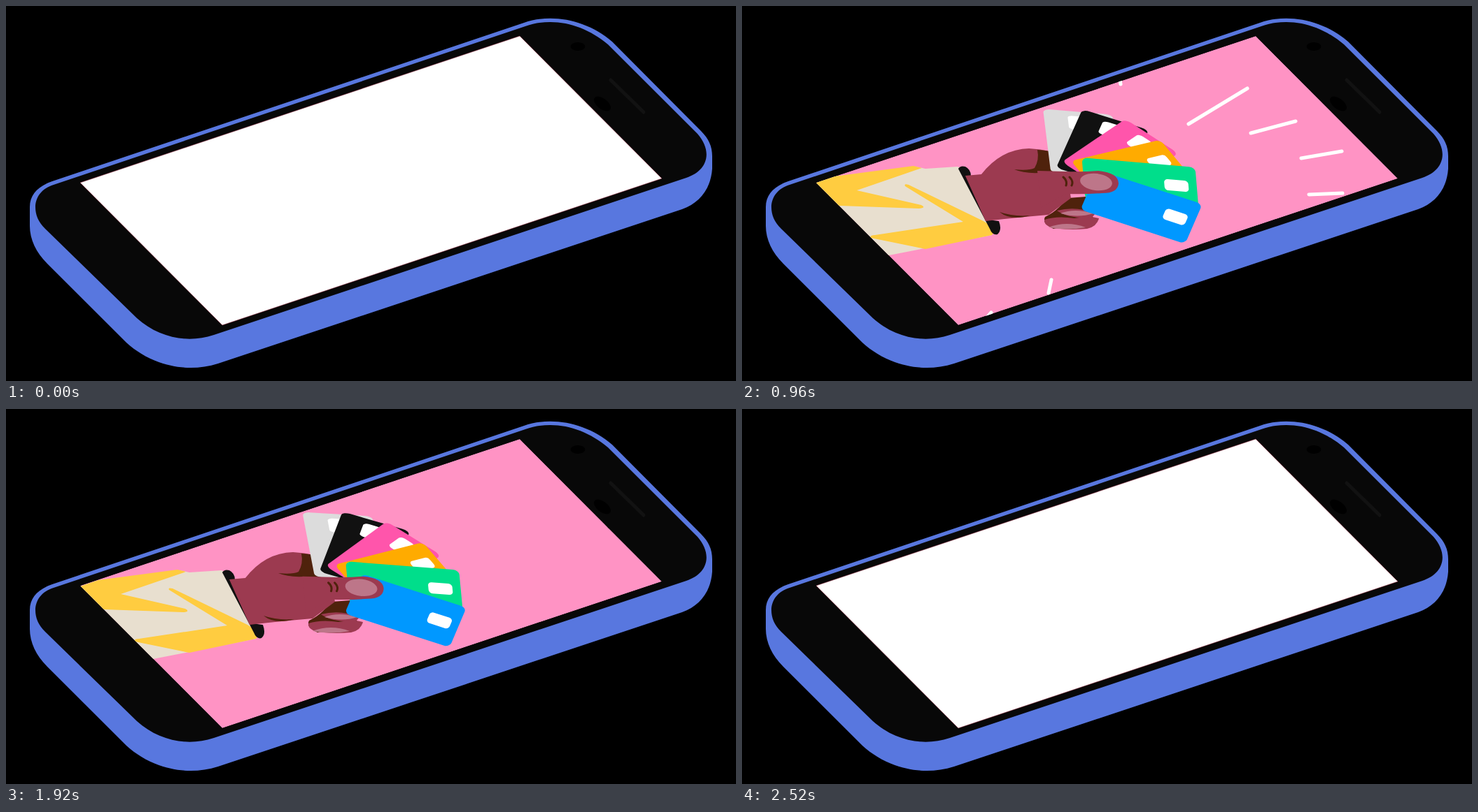
These frames come from a looping animation (1043x537 px, 3.08 s). An HTML page:

```html
<!DOCTYPE html>
<html lang="en">
<head>
<meta charset="utf-8">
<title>Card fan on a phone</title>
<style>
  html, body { margin: 0; width: 100%; height: 100%; overflow: hidden; background: #000; }
  svg { display: block; width: 100vw; height: 100vh; }
  .skin { fill: #9c3a50; }
  .shade { fill: #4f220c; }
  .nail { fill: #bd7689; }
  .yellow { fill: #ffcc40; }
</style>
</head>
<body>
<svg viewBox="0 0 1043 537">
  <defs>
    <clipPath id="glass"><path d="M106 253L734 43L937 247L309 457Z"/></clipPath>
  </defs>

  <path fill="#5877df" d="M34 288C34 270 46 258 66 251L740 24C780 10 830 20 866 51L993 179C1004 190 1009 201 1009 215V233C1007 262 991 282 966 291L303 512C256 527 206 513 172 482L59 369C43 353 34 334 34 315Z"/>
  <path fill="#080808" d="M42 288C42 273 52 261 68 256L742 29C782 15 826 26 860 55L988 183C1010 208 1003 236 972 246L297 471C258 484 217 474 187 447L56 319C46 309 42 299 42 288Z"/>
  <ellipse cx="817" cy="58" rx="10.5" ry="6"/>
  <ellipse cx="852" cy="140" rx="14" ry="7.5" transform="rotate(38 852 140)"/>
  <path d="M864 106L911 152" stroke="#121212" stroke-width="5" stroke-linecap="round"/>

  <path id="blank" d="M106 253L734 43L937 247L309 457Z" fill="#fff" stroke="#a03048" stroke-width=".5"/>
  <g id="scene" clip-path="url(#glass)">
    <path fill="#ff93c4" d="M106 253L734 43L937 247L309 457Z"/>
    <g id="corner">
      <path class="yellow" d="M270 418Q302 430 331 450L309 460Z"/>
      <path fill="#fff" d="M295 443Q308 445 322 453L309 460Z"/>
    </g>
    <g id="rays" stroke="#fff" stroke-width="5" stroke-linecap="round"></g>

    <g id="arm">
      <path fill="#e8dfcf" d="M-300 300L106 253L132 244L248 230L262 233L308 230L320 236L364 318L357 328L210 357L-300 420Z"/>
      <path class="yellow" d="M-300 300L106 253L132 244L245 229L257 232L164 264L256 285Q264 289 253 290L140 286L-300 340Z"/>
      <path class="yellow" d="M233 258Q231 254 238 256L345 308L364 320L357 328L262 348L184 332Q182 328 190 328L316 309Z"/>
      <path fill="#111" d="M309 233Q312 228 319 230Q327 234 327 243L351 306L367 308Q372 321 365 327Q358 329 354 319Z"/>
      <path class="shade" d="M466 275L492 273L489 292L508 308L445 319Q428 311 433 302Q445 296 452 289Z"/>
      <path class="skin" d="M319 243L342 241Q370 205 410 204Q445 206 456 216L465 245L470 275L438 299Q400 302 348 308Z"/>
      <path class="shade" d="M422 206Q448 207 456 217L446 228L464 241L425 239Q403 240 389 234Q410 236 418 232Q425 220 422 206Z"/>
      <path class="shade" d="M368 295Q388 302 412 300Q384 308 368 295Z"/>
      <path class="skin" d="M450 293Q478 286 505 297L500 303Q467 305 450 293Z"/>
      <path class="nail" d="M455 297Q475 289 502 297Q480 304 455 297Z"/>
      <path class="skin" d="M432 306Q450 300 475 304Q497 300 510 304Q507 316 493 319Q460 322 439 316Q431 312 432 306Z"/>
      <path class="nail" d="M438 317Q464 307 491 317Q464 322 438 317Z"/>
      <g id="cards"></g>
      <g id="thumb">
        <path class="skin" d="M425 241L465 242Q488 243 512 241Q541 244 541 259Q540 273 518 273Q492 275 466 274L430 294Z"/>
        <ellipse class="nail" cx="509" cy="257" rx="23" ry="12" transform="rotate(7 509 257)"/>
        <path d="M462 250Q468 255 466 262M471 250Q477 256 474 262" fill="none" stroke="#4f220c" stroke-width="3" stroke-linecap="round"/>
      </g>
    </g>
  </g>
</svg>
<script>
const LOOP = 3080, STEP = 40, SHOW = 360, HIDE = 2520;
const $ = id => document.getElementById(id);

function add(parent, name, attrs) {
  const node = document.createElementNS('http://www.w3.org/2000/svg', name);
  for (const key in attrs) node.setAttribute(key, attrs[key]);
  return parent.appendChild(node);
}

const mix = (a, b, k) => a + (b - a) * k;
const mixAll = (a, b, k) => a.map((v, i) => mix(v, b[i], k));

// Linear interpolation in a table of [time, value].
function track(keys, t) {
  if (t <= keys[0][0]) return keys[0][1];
  for (let i = 1; i < keys.length; i++) {
    const [t0, v0] = keys[i - 1], [t1, v1] = keys[i];
    if (t <= t1) return mix(v0, v1, (t - t0) / (t1 - t0));
  }
  return keys[keys.length - 1][1];
}

// Each pose: corner x, y, long side x, y, short side x, y.
const cards = [
  { fill: '#dcdcdc', half: [443, 226, 60, -70, 95, 33], open: [441, 240, -21, -94, 100, 5] },
  { fill: '#111', half: [462, 230, 86, -61, 78, 49], open: [447, 232, 31, -87, 97, 27] },
  { fill: '#ff55ab', half: [465, 218, 123, -35, 52, 57], open: [456, 224, 86, -65, 79, 48] },
  { fill: '#ffab00', half: [476, 220, 139, -10, 32, 58], open: [469, 222, 126, -33, 47, 54] },
  { fill: '#00de8b', half: [489, 218, 162, 27, -2, 60], open: [485, 217, 162, 12, 6, 60] },
  { fill: '#0098ff', half: [508, 234, 148, 54, -29, 56], open: [508, 235, 150, 48, -24, 57] }
];
for (const card of cards) {
  card.node = add($('cards'), 'g', {});
  add(card.node, 'rect', { width: 150, height: 90, rx: 8, ry: 10, fill: card.fill });
  add(card.node, 'rect', { x: 107, y: 31, width: 32, height: 24, rx: 5, ry: 7, fill: '#fff' });
}
const closed = cards[cards.length - 1].half;

// Segment at its fullest, and the moment of that.
const rays = [
  [594, 131, 619, 110, 640],
  [638, 169, 722, 118, 960],
  [727, 182, 791, 165, 960],
  [799, 218, 857, 208, 960],
  [810, 270, 858, 268, 960],
  [442, 392, 438, 411, 960],
  [541, 112, 540, 106, 960],
  [356, 439, 350, 446, 960]
].map(([x1, y1, x2, y2, peak]) => ({ x1, y1, x2, y2, peak, node: add($('rays'), 'line', {}) }));

const spread = [[480, -1], [560, -.6], [640, 0], [720, .5], [800, .76], [960, .88], [1200, 1],
  [1600, 1], [2000, .95], [2200, .88], [2320, .1], [2400, -1]];
const slide = [[400, 1], [440, .75], [480, .4], [520, .12], [560, 0], [2340, 0], [2400, .2], [2480, 1]];
const lift = [[640, 0], [800, 1], [1600, 1], [2200, 0]];
const sink = [[1600, 0], [2200, 2]];
const head = [[-200, -.8], [0, 1], [120, 1.15]];
const tail = [[-160, -.8], [0, 0], [120, 1.15]];

function drawCard(card, s) {
  const [x, y, ux, uy, vx, vy] = s < 0
    ? mixAll(card.half, closed, -s)
    : mixAll(card.half, card.open, s);
  card.node.setAttribute('transform',
    `matrix(${ux / 150} ${uy / 150} ${vx / 90} ${vy / 90} ${x} ${y})`);
}

function drawRay({ x1, y1, x2, y2, peak, node }, t) {
  const age = t - peak, a = track(tail, age), b = track(head, age);
  node.style.display = age > -160 && age < 120 ? '' : 'none';
  const ends = { x1: mix(x1, x2, a), y1: mix(y1, y2, a), x2: mix(x1, x2, b), y2: mix(y1, y2, b) };
  for (const key in ends) node.setAttribute(key, ends[key]);
}

function draw(now) {
  const t = Math.floor((now % LOOP) / STEP) * STEP;
  const on = t >= SHOW && t < HIDE;
  $('scene').style.display = on ? '' : 'none';
  $('blank').style.display = on ? 'none' : '';
  $('corner').style.display = t < SHOW + STEP ? '' : 'none';

  const out = track(slide, t), up = track(lift, t), s = track(spread, t);
  $('arm').setAttribute('transform', `translate(${-580 * out} ${100 * out + track(sink, t)})`);
  $('thumb').setAttribute('transform', `translate(${-3 * up} ${-5 * up})`);
  cards.forEach(card => drawCard(card, s));
  rays.forEach(ray => drawRay(ray, t));
}

const start = performance.now();
function tick() {
  draw(performance.now() - start);
  requestAnimationFrame(tick);
}
tick();
</script>
</body>
</html>
```
